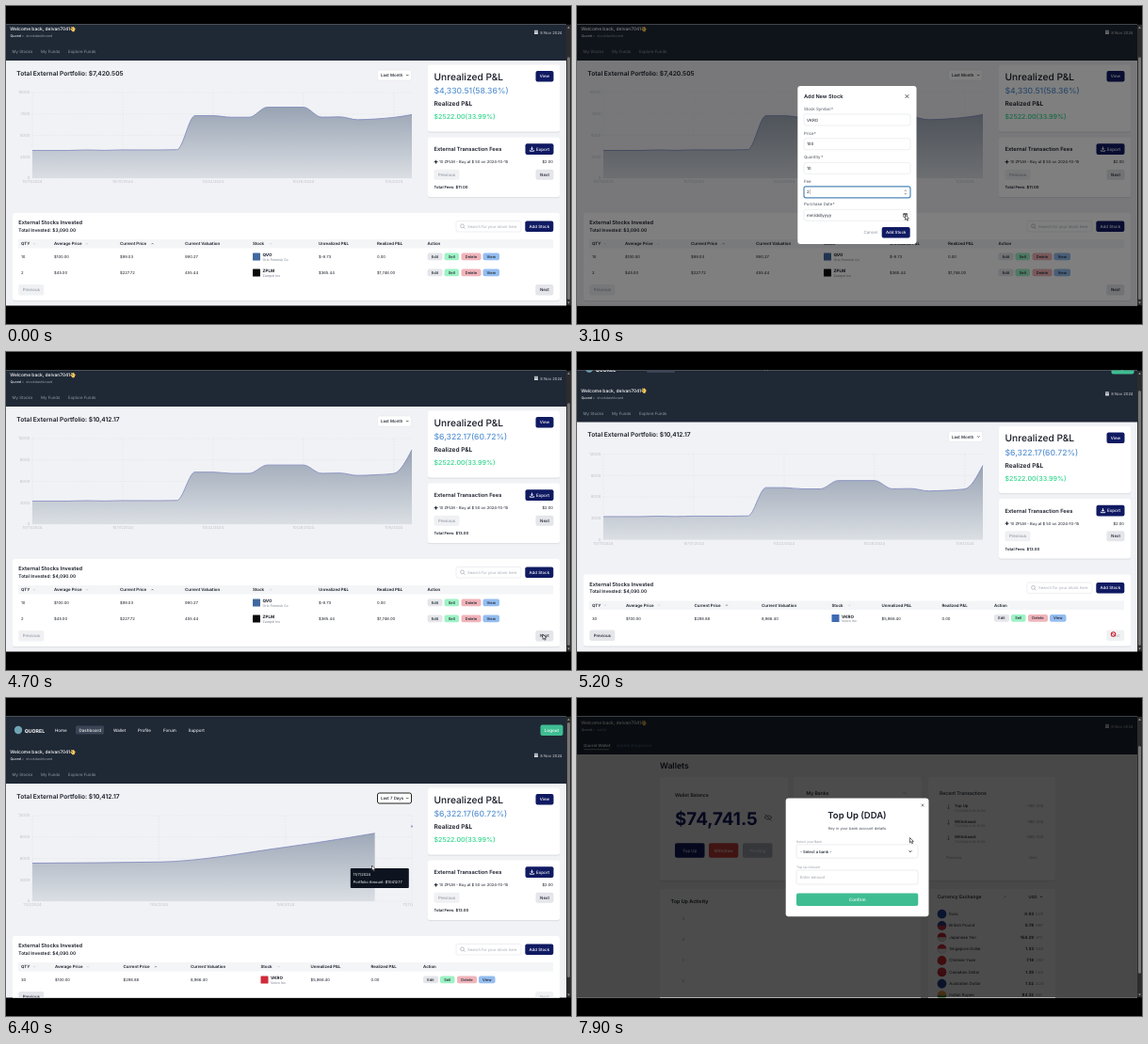
An HTML page for the animation above (8 s loop, 600x338 px).

```html
<!DOCTYPE html>
<html lang="en">
<head>
<meta charset="utf-8">
<title>Stock dashboard</title>
<style>
html, body { margin: 0; width: 100%; height: 100%; overflow: hidden; background: #000; }
svg { display: block; width: 100vw; height: 100vh; }
text { font-family: Inter, "Open Sans", sans-serif; text-rendering: geometricPrecision; white-space: pre; }
</style>
</head>
<body>
<svg id="stage" viewBox="0 0 600 338"></svg>
<script>
const LOOP = 8000, STEP = 100;
const INK = '#161b26', GREY = '#9299a5', NAVY = '#101a62', GREEN = '#3fbd92', PALE = '#e4e6ea', DARK = '#1f2835';
const stage = document.getElementById('stage');

// Drawing helpers
const esc = s => String(s).replace(/&/g, '&amp;').replace(/</g, '&lt;').replace(/>/g, '&gt;');
const text = (x, y, size, str, fill = INK, weight = 400, anchor = 'start') =>
  `<text x="${x}" y="${y}" font-size="${size}" fill="${fill}" font-weight="${weight}" text-anchor="${anchor}">${esc(str)}</text>`;
const rect = (x, y, w, h, fill, r = 0, extra = '') =>
  `<rect x="${x}" y="${y}" width="${w}" height="${h}" rx="${r}" fill="${fill}" ${extra}/>`;
const circle = (x, y, r, fill) => `<circle cx="${x}" cy="${y}" r="${r}" fill="${fill}"/>`;
const line = (d, color, w = 0.7, extra = '') =>
  `<path d="${d}" fill="none" stroke="${color}" stroke-width="${w}" ${extra}/>`;
const group = (dx, dy, body) => `<g transform="translate(${dx} ${dy})">${body}</g>`;
const card = (x, y, w, h) => rect(x, y + 0.7, w, h + 0.5, '#dfe1e5', 2.5) + rect(x, y, w, h, '#fff', 2.5);
const button = (x, y, w, h, fill, label, color = '#fff', size = 4.4, weight = 500) =>
  rect(x, y, w, h, fill, 2) + text(x + w / 2, y + h / 2 + size * 0.36, size, label, color, weight, 'middle');
const chevron = (x, y, color, s = 1.5, w = 0.7) => line(`M${x - s} ${y - s / 2}l${s} ${s}l${s} ${-s}`, color, w);
const cross = (x, y, s, color) => line(`M${x - s} ${y - s}l${2 * s} ${2 * s}m0 ${-2 * s}l${-2 * s} ${2 * s}`, color, 0.8);

// Linear interpolation through rows of [time, ...values]
function at(track, t) {
  const i = track.findIndex(row => row[0] > t);
  if (i < 0) return track[track.length - 1].slice(1);
  if (!i) return track[0].slice(1);
  const a = track[i - 1], b = track[i], k = (t - a[0]) / (b[0] - a[0]);
  return a.slice(1).map((v, j) => v + (b[j + 1] - v) * k);
}

// Text that grows by one letter per step
const typed = (str, t, start, blank = '', gap = 100) =>
  t < start ? blank : str.slice(0, Math.floor((t - start) / gap) + 1);

const POINTER = [
  [0, 590, 331], [300, 568, 235], [400, 566, 235], [700, 300, 121], [900, 270, 122], [1100, 250, 147],
  [1300, 238, 149.5], [1700, 238, 151], [1900, 262, 172], [2400, 262, 174], [2700, 280, 198], [2900, 300, 200],
  [3100, 348.5, 222], [3200, 348.5, 222], [3400, 331, 264], [3500, 331, 264], [3700, 340, 240], [3800, 340, 240],
  [4000, 583.5, 25], [4300, 583.5, 25], [4700, 570, 300], [5300, 569.5, 300], [5700, 412, 106], [5900, 412, 106],
  [6100, 405, 130], [6400, 388.5, 178], [6600, 389, 178], [7000, 120, 34], [7200, 120, 34],
  [7450, 120, 160], [7600, 120, 160], [7900, 353.5, 148.5]
];
const SCROLL = [[0, 33], [4999, 33], [5000, 16.5], [5300, 16.5], [5600, 0], [7200, 0], [7400, 31]];

function header(page, tabs) {
  const nav = [['Home', 52], ['Dashboard', 77.5], ['Wallet', 114], ['Profile', 140], ['Forum', 167], ['Support', 193.5]];
  const wave = line('M69 57.5l2.2 2.2M69.8 55.8l2.6 2.6M71.5 55.6l1.6 2M70 58.4l2.3 1', '#f3c65a', 1.3, 'stroke-linecap="round"');
  return rect(0, 10, 595, 81, DARK) + circle(13, 34, 4.2, '#6fa3b4')
    + text(19.8, 37, 5.2, 'QUOREL', '#fff', 700)
    + (page === 'wallet' ? rect(110.5, 29.5, 21, 9, '#3a4454', 1.5) : rect(74, 29.5, 30, 9, '#3a4454', 1.5))
    + nav.map(([s, x]) => text(x, 35.8, 4.5, s, '#e8eaee', 500)).join('')
    + button(567.5, 28.5, 24, 11.5, GREEN, 'Logout', '#fff', 4.5)
    + text(4.3, 59, 4.9, 'Welcome back, delvan7041', '#fff', 500) + wave
    + text(4.5, 66, 3.7, 'Quorel', '#e8eaee', 500) + text(16.8, 66, 3.7, '>  ' + page, GREY)
    + rect(561, 58.8, 4, 4.2, '#c9cdd4', 0.6) + line('M561 60.2h4', DARK, 0.4)
    + text(567.3, 62.6, 4.2, '8 Nov 2024', '#d4d7dc')
    + tabs.map(([s, x, color, weight]) => text(x, 83.3, 4.4, s, color, weight)).join('');
}

// Monotone cubic path through evenly spaced points
function monotone(xs, ys) {
  const n = xs.length, h = xs[1] - xs[0];
  const d = ys.slice(1).map((y, i) => (y - ys[i]) / h);
  const m = ys.map((_, i) => i && i < n - 1 && d[i - 1] * d[i] > 0 ? 2 * d[i - 1] * d[i] / (d[i - 1] + d[i]) : 0);
  m[0] = (3 * d[0] - m[1]) / 2;
  m[n - 1] = (3 * d[n - 2] - m[n - 2]) / 2;
  return xs.slice(1).reduce((p, x, i) =>
    p + `C${xs[i] + h / 3} ${ys[i] + m[i] * h / 3} ${x - h / 3} ${ys[i + 1] - m[i + 1] * h / 3} ${x} ${ys[i + 1]}`,
    `M${xs[0]} ${ys[0]}`);
}

const MONTH = [3240, 3240, 3240, 3300, 3250, 3310, 3300, 3300, 3330, 7300, 7300, 7120, 7120,
  8290, 8290, 8290, 7130, 7170, 6830, 6920, 7100];

function chart(values, max, ticks, reveal) {
  const left = 28, right = 431, top = 125, base = 216;
  const xs = values.map((_, i) => left + i * (right - left) / (values.length - 1));
  const d = monotone(xs, values.map(v => base - v / max * (base - top)));
  let out = '';
  for (let i = 0; i <= 4; i++) {
    const y = base - i * (base - top) / 4;
    out += line(`M${left} ${y}H${right}`, '#d5d8dd', 0.4, 'stroke-dasharray="1.5 1.5"')
      + text(25.5, y + 1.4, 4.3, max * i / 4, '#bcc0c7', 400, 'end');
  }
  for (const [i, label] of ticks) {
    out += line(`M${xs[i]} ${top}V${base}`, '#d5d8dd', 0.4, 'stroke-dasharray="1.5 1.5"')
      + text(xs[i], 221, 4.2, label, '#bcc0c7', 400, 'middle');
  }
  return `<clipPath id="plot"><rect x="0" y="95" width="432" height="135"/></clipPath>
    <clipPath id="grow"><rect x="27" y="95" width="${1 + 404 * reveal}" height="130"/></clipPath>
    <g clip-path="url(#plot)">${out}<g clip-path="url(#grow)">
    <path d="${d}V${base}H${left}Z" fill="url(#area)"/>${line(d, '#7d86bd', 0.8)}</g></g>`;
}

function select(label, focus) {
  return rect(394.5, 101, 36, 11, '#fff', 2, `stroke="${focus ? '#222' : '#e1e3e7'}" stroke-width="${focus ? 1 : 0.5}"`)
    + text(398, 108, 4.4, label, INK, 500) + chevron(426.3, 106.5, INK, 1.2);
}

const COLS = [
  [16, 51, 121, 190, 262, 332, 394, 447.5],
  [16, 52, 124.5, 196, 270.5, 323.5, 387.5, 443]
];
const HEADS = ['QTY', 'Average Price', 'Current Price', 'Current Valuation', 'Stock', 'Unrealized P&L', 'Realized P&L', 'Action'];
const CARETS = [[0, 14], [1, 35], [2, 34.5], [4, 19]];
const ACTIONS = [['Edit', 0, 16, '#e4e6ea'], ['Sell', 18, 15.5, '#9df2c5'], ['Delete', 36, 21, '#efb4ba'], ['View', 59, 17.5, '#94bdf0']];
const STOCKS = [
  ['10', '$100.00', '$99.03', '990.27', 'QVO', 'Orlo Fennick Co', '#41699f', '$-9.73', '0.00'],
  ['2', '$45.00', '$227.72', '455.44', 'ZPLM', 'Zumpel Inc', '#0a0a0a', '$365.44', '$1,746.00']
];
const added = color => ['30', '$100.00', '$298.88', '8,966.40', 'VKRO', 'Vokro Inc', color, '$5,966.40', '0.00'];

function stockRow(cols, row, y) {
  const [qty, avg, price, value, sym, name, color, open, done] = row;
  const cells = [qty, avg, price, value, null, open, done];
  return cells.map((s, i) => s === null ? '' : text(cols[i], y, 4.2, s)).join('')
    + rect(cols[4], y - 5.6, 8, 8, color, 0.5)
    + text(cols[4] + 10.5, y - 1.7, 4.5, sym, INK, 700) + text(cols[4] + 10.5, y + 2.7, 3.6, name, '#777f8c')
    + ACTIONS.map(([s, dx, w, fill]) => button(cols[7] + dx, y - 5.5, w, 7.8, fill, s, INK, 4)).join('');
}

function table(second, fresh, t) {
  const cols = COLS[+second], rows = second ? [added(t < 5400 ? '#3d6bb3' : '#cf2b3a')] : STOCKS;
  const foot = 312 + 17 * (rows.length - 1);
  return card(7, 253, 581, foot + 17 - 253)
    + text(13.3, 265.4, 5.7, 'External Stocks Invested', INK, 600)
    + text(13.3, 272.9, 4.9, 'Total Invested: $' + (fresh ? '4,090.00' : '3,090.00'), INK, 600)
    + rect(478, 261.5, 69, 11.5, '#fff', 2, 'stroke="#e3e5e9" stroke-width="0.6"')
    + `<circle cx="484.5" cy="266.8" r="1.9" fill="none" stroke="${GREY}" stroke-width="0.6"/>` + line('M485.9 268.2l1.6 1.6', GREY, 0.6)
    + text(490, 268.7, 4.2, 'Search for your stock here', '#a3a9b3')
    + button(551.3, 261.5, 30, 11.5, NAVY, 'Add Stock')
    + rect(13, 281, 568, 9.5, '#f4f5f7')
    + HEADS.map((s, i) => text(cols[i], 287.2, 4.4, s, INK, 600)).join('')
    + CARETS.map(([i, dx]) => i === 2 ? line(`M${cols[2] + dx - 1} 286.2l1 -1l1 1`, '#333', 0.6) : chevron(cols[i] + dx, 285.7, '#a8adb6', 1, 0.5)).join('')
    + rows.map((row, i) => stockRow(cols, row, 301 + 17 * i)).join('')
    + button(13.3, foot, 27, 11.5, second ? PALE : '#f0f1f3', 'Previous', second ? INK : GREY)
    + button(562.3, foot, 19, 11.5, second ? '#f0f1f3' : PALE, 'Next', second ? '#b9bec6' : INK);
}

function dashboard(t) {
  const fresh = t >= 4400, second = t >= 5000, week = t >= 5900;
  const monthGrow = fresh ? Math.min(1, (t - 4300) / 400) : 1;
  const weekGrow = Math.min(1, (t - 5850) / 611);
  const dates = ['10/11/2024', '10/17/2024', '10/22/2024', '10/28/2024', fresh ? '11/6/2024' : '11/5/2024'];
  const plot = week
    ? chart([5340, 5500, 7580, 10412], 12000, [[0, '11/2/2024'], [1, '11/5/2024'], [2, '11/6/2024'], [3, '11/7/2024']], weekGrow)
    : chart([...MONTH, fresh ? 10412 : 7420], fresh ? 12000 : 10000, dates.map((s, i) => [i * 5, s]), monthGrow);
  const tip = t >= 6300 && t < 6700
    ? circle(431, 136.5, 0.9, '#7d86bd') + rect(365.8, 181, 62, 21, '#0d1420', 1)
      + text(368.8, 188.6, 4, '11/7/2024', '#fff') + text(368.8, 196.8, 4, 'Portfolio Amount: $10412.17', '#fff') : '';
  return rect(0, 10, 595, 400, '#f1f2f5')
    + header('stockdashboard', [['My Stocks', 6.5, GREY], ['My Funds', 37, GREY], ['Explore Funds', 66, GREY]])
    + text(11.3, 106.5, 6.65, 'Total External Portfolio: $' + (fresh ? '10,412.17' : '7,420.505'), INK, 600)
    + select(week ? 'Last 7 Days' : 'Last Month', t >= 5700) + plot
    + card(448, 95.5, 140, 71)
    + text(454.5, 111.7, 10.2, 'Unrealized P&L', INK, 500) + button(562.5, 102, 19, 11.5, NAVY, 'View')
    + text(454.5, 126.2, 8.6, fresh ? '$6,322.17(60.72%)' : '$4,330.51(58.36%)', '#5a93d2', 500)
    + text(454.5, 139.3, 6.6, 'Realized P&L', INK, 600)
    + text(454.5, 153.2, 7.1, '$2522.00(33.99%)', '#2fd58b', 500)
    + card(448, 172.5, 140, 63.5)
    + text(454.5, 187.4, 5.75, 'External Transaction Fees', INK, 600)
    + rect(551.5, 179.3, 30, 11.7, NAVY, 2) + text(563, 186.8, 4.5, 'Export', '#fff', 500)
    + line('M558.5 182.6v3M557.1 184.4l1.4 1.4l1.4 -1.4M556.3 186.2v1h4.4v-1', '#fff', 0.9)
    + line('M454.7 198.7h3.8M456.6 196.8v3.8', INK, 1)
    + text(460, 200.3, 4.15, '10 ZPLM - Buy at $ 50 on 2024-10-15') + text(581, 200.3, 4.2, '$2.00', INK, 400, 'end')
    + button(454.5, 206.8, 27, 11, '#f0f1f3', 'Previous', GREY) + button(562.5, 206.8, 19, 11, PALE, 'Next', INK)
    + text(454.5, 227.4, 4.2, 'Total Fees: $' + (fresh ? '13.00' : '11.00'), INK, 600)
    + table(second, fresh, t) + tip;
}

const RATES = [
  ['Euro', '0.93', 'EUR', '#2347a0', '#2347a0'], ['British Pound', '0.78', 'GBP', '#27408f', '#c63545'],
  ['Japanese Yen', '154.29', 'JPY', '#c92434', '#d9d9d9'], ['Singapore Dollar', '1.33', 'SGD', '#d62f3e', '#eeeeee'],
  ['Chinese Yuan', '7.18', 'CNY', '#d62a2f', '#d62a2f'], ['Canadian Dollar', '1.39', 'CAD', '#d2323d', '#c92434'],
  ['Australian Dollar', '1.52', 'AUD', '#23418f', '#23418f'], ['Indian Rupee', '84.32', 'INR', '#e89a4a', '#3c8a52']
];
const MOVES = [['Top Up', '+50'], ['Withdrawal', '-100'], ['Withdrawal', '-200']];

function wallet() {
  const rates = RATES.map(([name, rate, code, top, low], i) => {
    const y = 260.5 + i * 12.35;
    return circle(387.5, y, 4.8, top) + `<path d="M382.7 ${y}a4.8 4.8 0 0 0 9.6 0z" fill="${low}"/>`
      + text(395.3, y + 1.5, 4.3, name) + text(485, y + 1.5, 4.4, rate, INK, 600, 'end') + text(487, y + 1.5, 4, code, GREY);
  }).join('');
  const moves = MOVES.map(([name, sum], i) => {
    const y = 147 + i * 16.5;
    return line(`M394.5 ${y - 3}v5m-1.3 -1.5l1.3 1.5l1.3 -1.5`, '#5d6571', 0.5) + text(401, y, 4.2, name, INK, 500)
      + text(401, y + 4.6, 3.2, '7/11/2024 8:42:16 PM', GREY) + text(486, y, 4.2, sum, '#777f8c', 400, 'end') + text(487.5, y, 3.8, 'SGD', GREY);
  }).join('');
  return rect(0, 10, 595, 430, '#f1f2f5')
    + header('wallet', [['Quorel Wallet', 7, '#fff', 600], ['Assets & Expense', 42, '#5f86b0']])
    + line('M7 85.7h27', '#fff', 0.5)
    + text(88, 105.7, 8.7, 'Wallets', INK, 600)
    + card(88, 115, 136, 110) + card(230, 115, 136, 110) + card(373, 115, 135, 110)
    + card(88, 234, 277, 140) + card(373, 234, 135, 140)
    + text(104, 136.2, 5.1, 'Wallet Balance', INK, 500) + text(104, 166.2, 18.8, '$74,741.5', NAVY, 700)
    + line('M199 158q4 -4 8 0q-4 4 -8 0M199.5 154.5l7 7', '#4f5560', 0.8)
    + button(104, 185.3, 31.5, 15.5, NAVY, 'Top Up') + button(140, 185.3, 31.3, 15.5, '#d9433f', 'Withdraw')
    + button(176, 185.3, 31.5, 15.5, '#b5bac2', 'Pending')
    + text(243.5, 133.8, 5.1, 'My Banks', INK, 500) + chevron(348, 132, GREY)
    + text(385, 133.8, 5.1, 'Recent Transactions', INK, 500) + moves
    + text(392, 201.5, 4, 'Previous', GREY) + text(480, 201.5, 4, 'Next', GREY)
    + text(99.5, 249, 5.4, 'Top Up Activity', INK, 600)
    + [0, 1, 2, 3, 4].map(i => text(114, 266.5 + i * 22, 4, 5 - i, GREY, 400, 'end')).join('')
    + text(382.5, 244, 5, 'Currency Exchange', INK, 500) + line('M453 243.5l2 -2m-1.2 0h1.2v1.2', GREY, 0.5)
    + text(479.5, 244, 4.3, 'USD', INK, 500) + chevron(493, 242.4, INK, 1.1) + rates;
}

const shade = alpha => rect(0, 19.5, 595, 299, '#000', 0, `fill-opacity="${alpha}"`);

function addForm(t) {
  const focus = t < 1100 ? 0 : t < 1900 ? 1 : t < 2700 ? 2 : t < 3200 ? 3 : 4;
  const fields = [
    ['Stock Symbol', 115, typed('VKRO', t, 600)],
    ['Price', 140.8, typed('100', t, 1200, '0')],
    ['Quantity', 166.3, typed('10', t, 2200, '0')],
    ['Fee', 191.8, typed('2', t, 3000, '0')],
    ['Purchase Date', 216.3, t < 3500 ? 'mm/dd/yyyy' : '11/07/2024']
  ];
  const body = fields.map(([label, y, value], i) => {
    const on = i === focus && t >= 500;
    const caret = on && i < 4 ? `<tspan fill="#222" font-weight="300">|</tspan>` : '';
    const spin = on && i && i < 4 ? line(`M347.8 ${y + 5}l1 -1.2l1 1.2M347.8 ${y + 7.2}l1 1.2l1 -1.2`, '#555', 0.6) : '';
    return text(241, y - 4, 4.4, label, '#4a515d') + (i === 3 ? '' : text(241 + [29, 10.8, 18.3, 0, 30.6][i], y - 4, 4.2, '*', '#4a515d'))
      + rect(241, y, 113, 12, '#fff', 2, `stroke="${on ? '#4f86b8' : '#e0e2e6'}" stroke-width="${on ? 1.2 : 0.6}"`)
      + text(244, y + 7.6, 4.4, value).replace('</text>', caret + '</text>') + spin;
  }).join('');
  return shade(0.5) + rect(234.3, 85, 126.2, 168, '#fff', 3)
    + text(241, 98, 5.6, 'Add New Stock', INK, 600) + cross(350.5, 96, 1.9, '#333') + body
    + rect(346.6, 220.5, 4, 3.8, 'none', 0.4, 'stroke="#222" stroke-width="0.6"') + line('M346.6 221.4h4', '#222', 0.8)
    + text(304.5, 242.3, 4.4, 'Cancel', '#858c98') + button(323.7, 235, 30, 11.5, NAVY, 'Add Stock')
    + (t >= 3200 && t < 3500 ? calendar() : '');
}

function calendar() {
  let out = rect(288, 229, 68, 87, '#fff', 1, 'stroke="#bbb" stroke-width="0.5"') + text(292, 237, 4, 'November 2024', INK, 600);
  [...'SMTWTFS'].forEach((s, i) => out += text(295 + 9 * i, 246, 3.6, s, '#555', 400, 'middle'));
  for (let day = 1; day <= 30; day++) {
    const cell = day + 4, x = 295 + 9 * (cell % 7), y = 256 + 9.5 * Math.floor(cell / 7);
    out += (day === 8 ? rect(x - 4, y - 5, 8, 7, 'none', 1, 'stroke="#333" stroke-width="0.5"') : '')
      + text(x, y, 3.8, day, INK, 400, 'middle');
  }
  return out + text(292, 312, 3.8, 'Clear', '#2f6fd0') + text(352, 312, 3.8, 'Today', '#2f6fd0', 400, 'end');
}

function topUpForm() {
  const box = 'stroke="#dfe1e5" stroke-width="0.6"';
  return shade(0.7) + rect(221.7, 106.5, 151.8, 125.7, '#fff', 3) + cross(367, 114, 1.4, '#777')
    + text(297.5, 128.4, 9.5, 'Top Up (DDA)', INK, 600, 'middle')
    + text(297.5, 139.6, 4, 'Key in your bank account details', '#444b57', 400, 'middle')
    + text(233, 153.9, 3.4, 'Select your Bank', GREY) + rect(233, 155.8, 129, 14.4, '#fff', 2, box)
    + text(237, 164.5, 4.2, '- Select a bank -', INK, 500) + chevron(354, 163, INK, 1.4, 0.9)
    + text(233, 181.3, 3.4, 'Top Up Amount', GREY) + rect(233, 183, 129, 15, '#fff', 2, box)
    + text(237, 192, 4.2, 'Enter amount', '#9aa0aa') + button(233, 207.5, 129.3, 13.5, GREEN, 'Confirm', '#fff', 4.6);
}

function toast(t) {
  const [dx] = at([[3800, 95], [3950, 0], [4200, 0], [4400, 95]], t);
  const left = 88 * (1 - (t - 3900) / 1500);
  return group(dx, 0, rect(501, 25.3, 88, 18.5, '#fff', 1.5) + circle(508, 34.2, 3.2, '#1ecb83')
    + text(514, 35.8, 4.15, 'Stock successfully added!', '#777e89') + cross(585.5, 29, 0.9, '#999')
    + line(`M501 42.8h${left}`, '#1ecb83', 1.6));
}

function scrollbar(pos, max) {
  const len = 286 * 300 / (300 + max), y = 26 + (286 - len) * (max ? pos / max : 0);
  return rect(595, 19.5, 5, 299, '#2c2c2c') + rect(596, y, 3, len, '#757575', 1.5)
    + `<path d="M597.5 21.8l1.4 2h-2.8zM597.5 316.4l1.4 -2h-2.8z" fill="#999"/>`;
}

function pointer(t) {
  const [x, y] = at(POINTER, t);
  if (t >= 5100 && t <= 5300) {
    return `<circle cx="${x}" cy="${y}" r="2.2" fill="#fff" stroke="#c8202c" stroke-width="1.1"/>`
      + line(`M${x - 1.5} ${y - 1.5}l3 3`, '#c8202c', 1);
  }
  return `<path transform="translate(${x} ${y})" d="M0 0v5.4l1.3 -1.2l.9 2l.9 -.4l-.9 -1.9h1.7z" fill="#fff" stroke="#111" stroke-width="0.6"/>`;
}

function scene(t) {
  const [scroll] = at(SCROLL, t), onWallet = t >= 7100;
  const max = onWallet ? 55 : t >= 5000 ? 16.5 : 33;
  const form = t >= 400 && t < 3800 ? addForm(t) : t >= 7600 ? topUpForm() : '';
  return `<defs><linearGradient id="area" x1="0" y1="0" x2="0" y2="1">
      <stop offset="0" stop-color="#98a3b3"/><stop offset="1" stop-color="#dbdfe4"/></linearGradient>
    <clipPath id="view"><rect x="0" y="19.5" width="600" height="299"/></clipPath></defs>
    ${rect(0, 0, 600, 338, '#000')}
    <g clip-path="url(#view)">${group(0, -scroll, onWallet ? wallet() : dashboard(t))}${form}
    ${t >= 3900 && t < 4400 ? toast(t) : ''}${scrollbar(scroll, max)}${pointer(t)}</g>`;
}

let shown = -1;
function tick() {
  const t = Math.floor(performance.now() % LOOP / STEP) * STEP;
  if (t !== shown) stage.innerHTML = scene(shown = t);
  requestAnimationFrame(tick);
}
tick();
</script>
</body>
</html>
```
